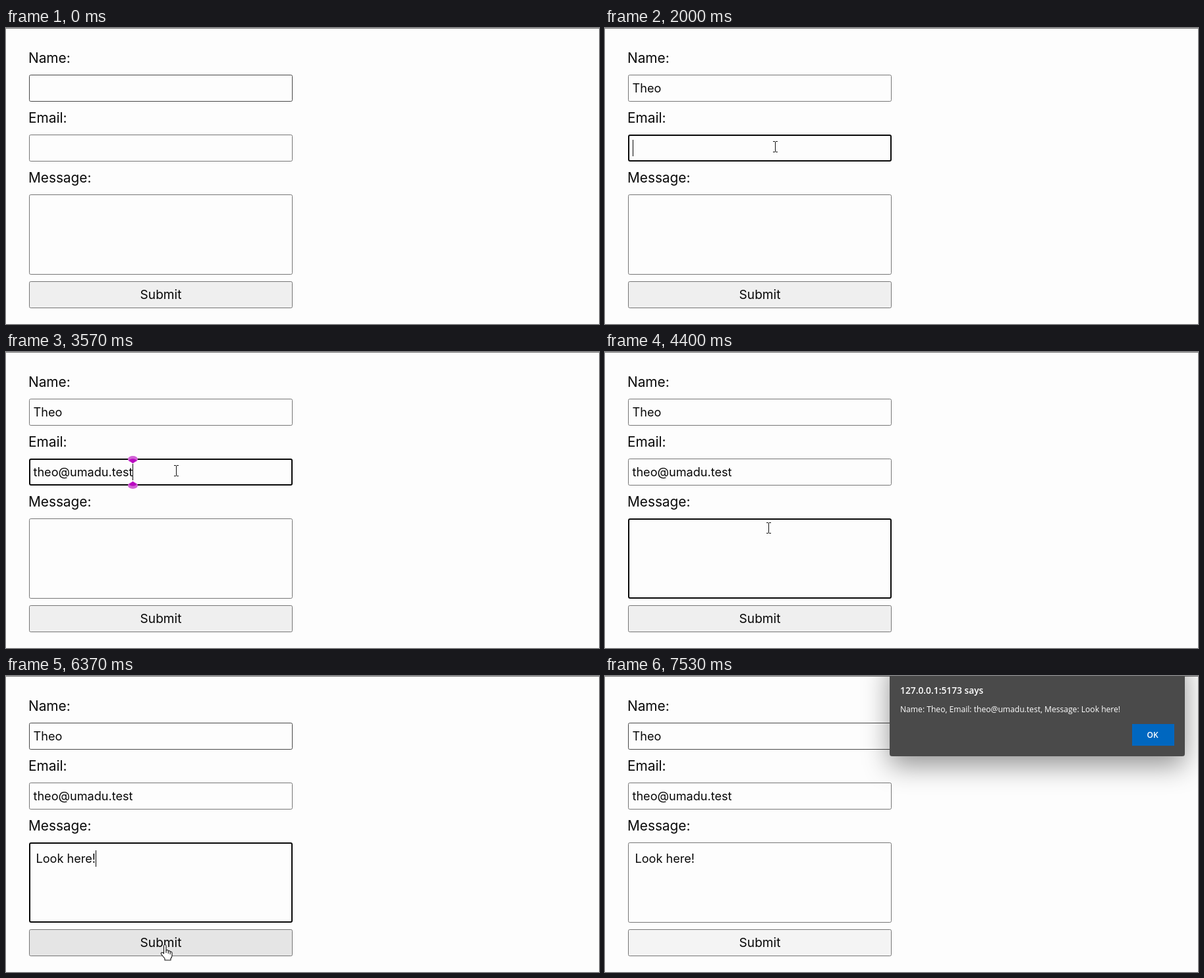
Animation of 900x450 px, one loop 8 s. Source, as an HTML page with a canvas:

```html
<!DOCTYPE html>
<html lang="en">
<head>
<meta charset="utf-8">
<title>Contact form</title>
<style>
  html, body { margin: 0; width: 100%; height: 100%; overflow: hidden; background: #fdfdfd; }
  canvas { display: block; }
</style>
</head>
<body>
<canvas id="stage" width="900" height="450"></canvas>
<script>
const ctx = document.getElementById('stage').getContext('2d');
const LOOP = 8000;
const FORM = 'Inter, "Open Sans", sans-serif';
const DIALOG = '"Open Sans", "Noto Sans", sans-serif';
const EDGE = '#767676';
const INK = '#080808';
const CLICK = 6400;

// n key times spread evenly from a to b
const spread = (a, b, n) => Array.from({ length: n }, (_, i) => a + (b - a) * i / (n - 1));

const fields = [
  { label: 'Name:', text: 'Theo', y: 71, h: 41, x: 41.5, mid: 92,
    focus: 30, blur: 1960, blink: 200, keys: spread(600, 1070, 4) },
  { label: 'Email:', text: 'theo@umadu.test', y: 162, h: 41, x: 41.5, mid: 183,
    focus: 1960, blur: 4130, blink: 200,
    keys: [...spread(2300, 2430, 4), 2770, ...spread(3000, 3570, 10)] },
  { label: 'Message:', text: 'Look here!', y: 253, h: 122, x: 45.5, mid: 278,
    focus: 4130, blur: CLICK, blink: 260, keys: spread(4630, 5270, 10) }
];
const summary = fields.map(f => f.label + ' ' + f.text).join(', ');

// time, x, y of the pointer's hot spot
const path = [
  [1470, 262, 88], [1930, 258, 180], [3970, 258, 180], [4110, 248, 267],
  [5970, 248, 267], [6300, 241, 409], [7270, 241, 409], [7330, 226, 440]
];

const clamp = v => Math.max(0, Math.min(1, v));
const smooth = p => p * p * (3 - 2 * p);

function write(str, x, y, font, color = INK, align = 'left') {
  ctx.font = font;
  ctx.fillStyle = color;
  ctx.textAlign = align;
  ctx.fillText(str, x, y);
}

function box(y, h, line, width, fill) {
  const d = width / 2;
  ctx.beginPath();
  ctx.roundRect(35 + d, y + d, 400 - width, h - width, 2);
  if (fill) {
    ctx.fillStyle = fill;
    ctx.fill();
  }
  ctx.strokeStyle = line;
  ctx.lineWidth = width;
  ctx.stroke();
}

// Pair of purple drops above and below the caret
function drops(x, mid, size) {
  for (const side of [-1, 1]) {
    ctx.save();
    ctx.translate(x, mid);
    ctx.scale(size, side * size);
    ctx.fillStyle = '#d263d6';
    ctx.beginPath();
    ctx.ellipse(0, 20, 7.5, 5, 0, 0, 7);
    ctx.fill();
    ctx.fillStyle = '#b90ac0';
    ctx.beginPath();
    ctx.moveTo(0, 13.5);
    ctx.lineTo(6, 18.5);
    ctx.quadraticCurveTo(0, 23, -6, 18.5);
    ctx.fill();
    ctx.restore();
  }
}

function drawField(f, i, t) {
  const active = t >= f.focus && t < f.blur;
  const typed = f.keys.filter(k => k <= t).length;
  const text = f.text.slice(0, typed);
  const dark = i === 0 && (t < 30 || t > 5970);

  write(f.label, 34, f.y - 18, '20.8px ' + FORM);
  box(f.y, f.h, active ? INK : dark ? '#484848' : EDGE, active ? 2 : 1);
  write(text, f.x, f.mid + 6, '18.1px ' + FORM);
  if (!active) return;

  const caret = Math.round(f.x + ctx.measureText(text).width);
  const last = typed ? f.keys[typed - 1] : f.focus;
  if (typed && t < f.keys[f.keys.length - 1] + 2 * f.blink + 10) {
    drops(caret + 0.5, f.mid, 1 + 0.55 * (1 - clamp((t - f.keys[0]) / 130)));
  }
  if ((t - last) % (2 * f.blink) < f.blink) {
    ctx.fillStyle = INK;
    ctx.fillRect(caret, f.mid - 13, 1, 25);
  }
}

function drawButton(t) {
  const fill = t >= CLICK ? '#f4f4f4' : t > 6250 ? '#e5e5e5' : '#efefef';
  box(385, 41, EDGE, 1, fill);
  write('Submit', 235, 412, '19.1px ' + FORM, INK, 'center');
}

function drawDialog(t) {
  const p = clamp((t - 6548) / 150);
  if (!p) return;
  const grow = 1 + 0.013 * (1 - p);
  const panel = new Path2D();
  panel.roundRect(432, -30, 448, 152, 4);
  const outside = new Path2D();
  outside.rect(0, -60, 1000, 600);
  outside.addPath(panel);

  ctx.save();
  ctx.globalAlpha = p;
  ctx.translate(656, -20 * (1 - p));
  ctx.scale(grow, grow);
  ctx.translate(-656, 0);

  // keep the shadow from showing through the fading panel
  ctx.save();
  ctx.clip(outside, 'evenodd');
  ctx.shadowColor = 'rgba(0, 0, 0, 0.42)';
  ctx.shadowBlur = 40;
  ctx.shadowOffsetY = 14;
  ctx.fill(panel);
  ctx.restore();

  ctx.fillStyle = '#4a4a4a';
  ctx.fill(panel);
  ctx.fillStyle = '#0067c0';
  ctx.fillRect(800, 73, 64, 33);
  ctx.globalAlpha = Math.sqrt(p);
  write('127.0.0.1:5173 says', 448, 27, '600 13.8px ' + DIALOG, '#fff');
  write(summary, 448, 55, '12.1px ' + DIALOG, '#fff');
  write('OK', 831, 94, '600 12px ' + DIALOG, '#fff', 'center');
  ctx.restore();
}

function beam() {
  ctx.fillStyle = '#111';
  ctx.fillRect(0, -7, 1, 15);
  for (const y of [-8, 8]) {
    ctx.fillRect(-3, y, 3, 1);
    ctx.fillRect(1, y, 3, 1);
  }
}

function outline(d) {
  const shape = new Path2D(d);
  ctx.fillStyle = '#fff';
  ctx.fill(shape);
  ctx.strokeStyle = '#111';
  ctx.lineWidth = 1.1;
  ctx.lineJoin = 'round';
  ctx.stroke(shape);
}

function hand() {
  outline('M-1.5 13V1.5Q-1.5 -.5 .2 -.5T2 1.5V8Q4.5 6.5 5.3 9Q7.6 8 8.2 10.2' +
    'Q11 9.5 11 12.5V16Q11 19 9 20.5V23H0V20.5L-5 14.5Q-6.5 12 -4.5 11.3Q-3 11 -1.5 13Z');
  ctx.beginPath();
  for (const [x, y] of [[2, 8], [5.3, 9], [8.2, 10.2]]) {
    ctx.moveTo(x, y);
    ctx.lineTo(x, y + 4);
  }
  ctx.stroke();
}

function arrow() {
  outline('M0 0V16L3.7 12.6L6.2 18.4L8.7 17.3L6.2 11.6H11.3Z');
}

function drawPointer(t) {
  const i = path.findIndex((k, n) => n && t < k[0]);
  if (t < path[0][0] || i < 0) return;
  const [a, b] = [path[i - 1], path[i]];
  const p = smooth((t - a[0]) / (b[0] - a[0]));
  const x = Math.round(a[1] + (b[1] - a[1]) * p);
  const y = Math.round(a[2] + (b[2] - a[2]) * p);
  ctx.save();
  ctx.translate(x, y);
  if (fields.some(f => y >= f.y && y < f.y + f.h)) beam();
  else if (y >= 385 && y < 426) hand();
  else arrow();
  ctx.restore();
}

function draw(t) {
  ctx.fillStyle = '#fdfdfd';
  ctx.fillRect(0, 0, 900, 450);
  ctx.fillStyle = EDGE;
  ctx.fillRect(0, 0, 900, 1);
  fields.forEach((f, i) => drawField(f, i, t));
  drawButton(t);
  drawDialog(t);
  drawPointer(t);
}

const start = performance.now();
function tick() {
  draw((performance.now() - start) % LOOP);
  requestAnimationFrame(tick);
}
tick();
</script>
</body>
</html>
```
